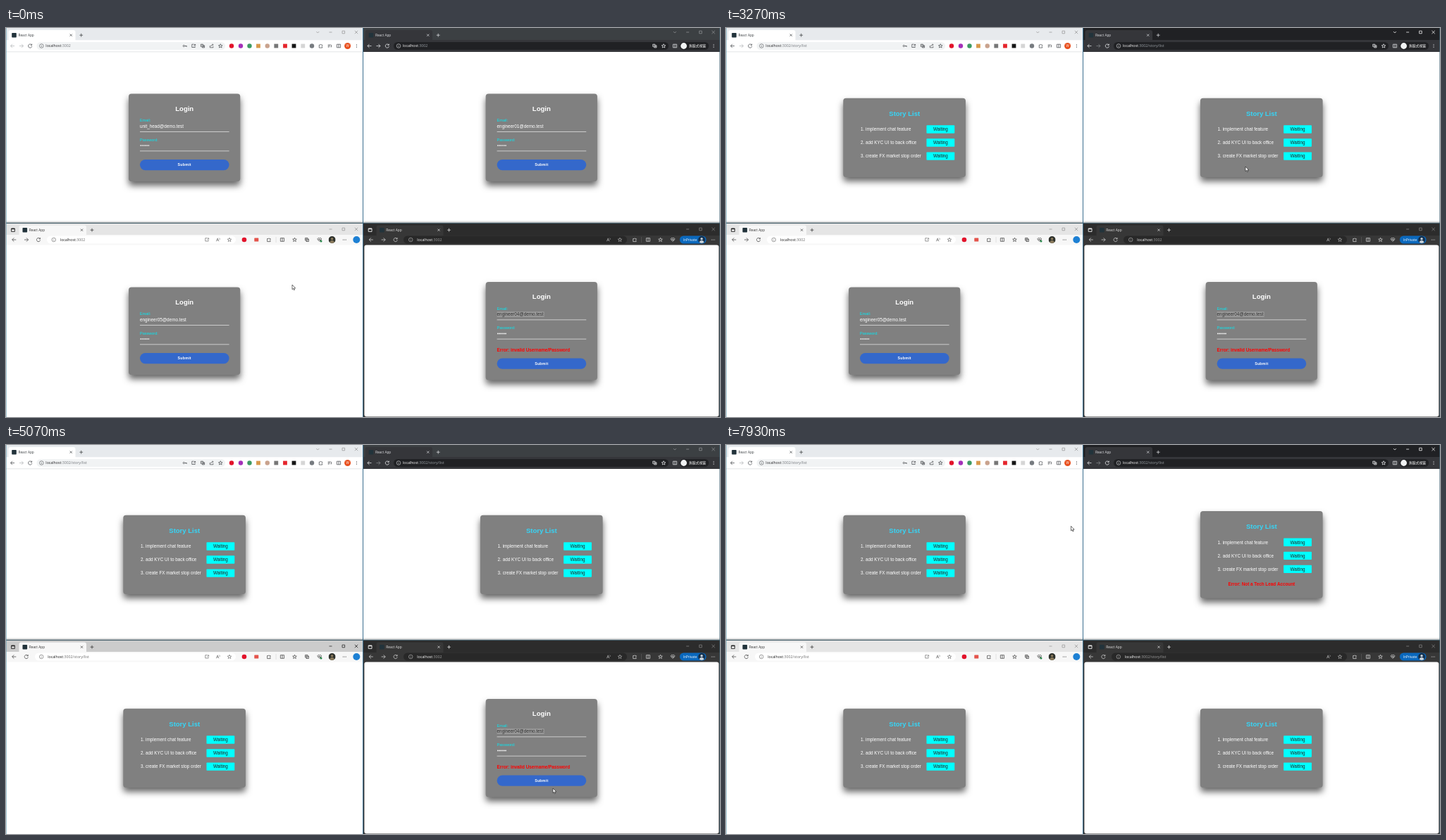
Write an HTML page with a canvas that moves like this. It is 1013 by 553 pixels and loops after 8000 ms.

```html
<!DOCTYPE html>
<html lang="en">
<head>
<meta charset="utf-8">
<title>Story board login</title>
<style>
html, body { margin: 0; width: 100%; height: 100%; overflow: hidden; background: #fff; }
canvas { display: block; width: 1013px; height: 553px; }
</style>
</head>
<body>
<canvas id="stage"></canvas>
<script>
const W = 1013, H = 553, LOOP = 8000, FPS = 15;
const canvas = document.getElementById('stage');
const g = canvas.getContext('2d');
const dpr = window.devicePixelRatio || 1;
canvas.width = W * dpr;
canvas.height = H * dpr;

const UI = '"Open Sans", "Noto Sans", sans-serif';
const CJK = '"Noto Sans CJK TC", "Noto Sans CJK JP", sans-serif';
const ARIAL = '"Liberation Sans", Arial, sans-serif';
const BODY = 6.33, COL = 506.6, ROW = 275;

// ---------- drawing helpers ----------
function box(x, y, x2, y2, fill, r = 0) {
  g.fillStyle = fill;
  g.beginPath();
  g.roundRect(x, y, x2 - x, y2 - y, r);
  g.fill();
}

function dot(x, y, r, fill) {
  g.fillStyle = fill;
  g.beginPath();
  g.arc(x, y, r, 0, 7);
  g.fill();
}

// y is the middle of the capitals
function text(s, x, y, size, color, { font = ARIAL, weight = 400, align = 'left', gap = 0 } = {}) {
  g.font = `${weight} ${size}px ${font}`;
  g.letterSpacing = gap + 'px';
  g.textAlign = align;
  g.fillStyle = color;
  g.fillText(s, x, y + size * 0.36);
  g.letterSpacing = '0px';
  return g.measureText(s).width;
}

const ICONS = {
  back: 'M2.8 0H-2.8M-.2-2.6L-2.8 0L-.2 2.6',
  fwd: 'M-2.8 0H2.8M.2-2.6L2.8 0L.2 2.6',
  reload: 'M2.2-1.4A2.6 2.6 0 1 0 2.6.5M2.5-2.9V-1.1H.7',
  info: 'M2.8 0A2.8 2.8 0 1 1-2.8 0A2.8 2.8 0 1 1 2.8 0M0-.3V1.5M0-1.6V-1.1',
  star: 'M0-2.8L.8-.9L2.8-.8L1.2.5L1.8 2.5L0 1.4L-1.8 2.5L-1.2.5L-2.8-.8L-.8-.9Z',
  close: 'M-1.6-1.6L1.6 1.6M1.6-1.6L-1.6 1.6',
  big: 'M-2.2-2.2L2.2 2.2M2.2-2.2L-2.2 2.2',
  plus: 'M-2.4 0H2.4M0-2.4V2.4',
  min: 'M-2 0H2',
  max: 'M-1.8-1.8H1.8V1.8H-1.8Z',
  chev: 'M-2-1L0 1L2-1',
  puzzle: 'M-2.3-1.5H-.8A.9.9 0 0 1 .9-1.5H2.1V-.1A.9.9 0 0 0 2.1 1.5V2.6H-2.3Z',
  split: 'M-2.6-2.3H2.6V2.3H-2.6ZM0-2.3V2.3',
  key: 'M-.4 0A1.1 1.1 0 1 1-2.6 0A1.1 1.1 0 1 1-.4 0H2.6V1.2M1.3 0V1',
  page: 'M.6-2.3H-2.2V2H2.2V.4M.4 0L2.6-1.8M1-2.1H2.7V-.4',
  share: 'M-2.3-.4V2.3H2.3V.6M-.9.5C-.7-1.2.4-1.7 2.4-1.7M1.2-2.8L2.5-1.7L1.2-.5',
  lang: 'M-2.6-2.4H.5V1H-2.6ZM-1.8-1H-.3M.5-.8H2.6V2.4H-.6V1M.6 1.7L1.5.2L2 1.7',
  list: 'M-2.6-1.6H1.4M-2.6 0H.4M-2.6 1.6H-.4M2.3-1.6V1.4M1.2 1.4H2.3',
  aloud: 'M-2.6 2.3L-.8-2.2L1 2.3M-2 .7H.4M1.5-2.4Q2.7-1.4 2.2-.2',
  heart: 'M0 2.4L-2.5-.2A1.4 1.4 0 0 1 0-1.8A1.4 1.4 0 0 1 2.5-.2ZM-2 0H-.6L0-.9L.6.8L1 0H2',
  stack: 'M-2.5-2.5H1V1H-2.5ZM-1 1V2.5H2.5V-1H1M-.7-1.7V.3M-1.7-.7H.3',
  window: 'M-2.4-2.2H2.4V2.2H-2.4ZM-2.4-1.5H2.4M-1.8-1.8H1.8'
};
for (const k in ICONS) ICONS[k] = new Path2D(ICONS[k]);

function icon(name, x, y, color, width = 0.75) {
  g.save();
  g.translate(x, y);
  g.strokeStyle = color;
  g.lineWidth = width;
  g.stroke(ICONS[name]);
  g.restore();
}

function icons(y, color, items) {
  for (const [name, x] of items) icon(name, x, y, color);
}

function more(x, y, color, dx, dy) {
  for (let i = -1; i < 2; i++) dot(x + i * dx, y + i * dy, 0.6, color);
}

function person(x, y, back, front) {
  g.save();
  g.beginPath();
  g.arc(x, y, 5, 0, 7);
  g.clip();
  box(x - 5, y - 5, x + 5, y + 5, back);
  dot(x, y - 1.2, 1.7, front);
  dot(x, y + 4.2, 3.2, front);
  g.restore();
}

function card(x, y, x2, y2) {
  g.save();
  g.shadowColor = 'rgba(0,0,0,.6)';
  g.shadowBlur = 10 * dpr;
  g.shadowOffsetY = 6 * dpr;
  box(x, y, x2, y2, '#808080', 4);
  g.restore();
}

// ---------- pages ----------
function loginPage(x, y, mail, hover, failed) {
  const shift = failed ? 15.2 : 0;
  const left = x + 190, mid = x + 253.2;
  card(x + 174, y + 93.5, x + 332.3, y + 218 + shift);
  text('Login', mid, y + 114.6, 9.5, '#fff', { weight: 700, align: 'center' });
  text('Email:', left, y + 131.5, 5.54, '#03e9f4');
  if (failed) box(left, y + 135.8, left + 67, y + 143.3, '#9b9b9b');
  text(mail, left, y + 139.8, BODY, failed ? '#303030' : '#fff');
  text('Password:', left, y + 158.8, 5.54, '#03e9f4');
  for (let i = 0; i < 6; i++) dot(left + 1.2 + i * 2.24, y + 167, 0.85, '#fff');
  for (const line of [147, 174.4]) box(left, y + line, x + 316.6, y + line + 0.8, '#e4e4e4');
  if (failed) text('Error: invalid Username/Password', left, y + 190.2, BODY, '#f00', { weight: 700 });
  const top = y + 187 + shift;
  box(left, top, x + 316.6, top + 15.2, hover ? '#0b5cf0' : '#3468cb', 7.6);
  text('Submit', mid, top + 7.6, 5.27, '#fff', { weight: 700, align: 'center', gap: 0.25 });
}

const STORIES = ['implement chat feature', 'add KYC UI to back office', 'create FX market stop order'];

function listPage(x, y, denied) {
  const up = denied ? 5.7 : 0;
  const mid = x + 253.2;
  card(x + 166.3, y + 99.8 - up, x + 340, y + 212 + up);
  text('Story List', mid, y + 121.2 - up, 9.5, '#35d5f7', { weight: 700, align: 'center' });
  STORIES.forEach((s, i) => {
    const cy = y + 144 + i * 19.05 - up;
    text(`${i + 1}. ${s}`, x + 191, cy, BODY, '#fff');
    box(x + 284.5, cy - 5.7, x + 324.3, cy + 5.7, '#0ff', 0.8);
    text('Waiting', x + 304.4, cy, BODY, '#222', { align: 'center' });
  });
  if (denied) text('Error: Not a Tech Lead Account', mid, y + 197.6, BODY, '#f00', { weight: 700, align: 'center' });
}

// ---------- browser frames ----------
function address(x, y, inner, strong, soft) {
  const opt = { font: UI };
  const w = text('localhost', x, y, 5.25, strong, opt);
  text(':3002' + (inner ? '/story/list' : ''), x + w, y, 5.25, soft, opt);
}

function tab(x, y, fg) {
  box(x, y - 3.3, x + 6.6, y + 3.3, '#22333b', 0.8);
  text('React App', x + 9.3, y, 4.75, fg, { font: UI });
  icon('close', x + 84, y, fg, 0.7);
  icon('plus', x + 98.5, y, fg);
}

function controls(x, y, color, chev) {
  if (chev) icon('chev', x + 442.3, y, color);
  icons(y, color, [['min', x + 460.5], ['max', x + 478.8]]);
  icon('big', x + 497, y, color);
}

function lightChrome(active, inner) {
  const ink = '#4a4d51', dim = '#b4b7ba', y = 25.5;
  box(0, 0, 506.5, 277, '#fff');
  box(0, 0, 506.5, 17.2, active ? '#dee1e6' : '#e7eaed');
  box(3.5, 3, 98.5, 18, '#fff', [3, 3, 0, 0]);
  tab(8.2, 10.2, '#3c4043');
  controls(0, 6, active ? '#222' : '#999', true);
  icon('back', 9.3, y, inner ? ink : dim);
  icon('fwd', 21.8, y, dim);
  icon('reload', 34.2, y, ink);
  box(43.5, 20, 311, 31, '#f1f3f4', 5.5);
  icon('info', 50.4, y, ink, 0.6);
  address(56.3, y, inner, '#202124', '#74787d');
  icons(y, ink, [['key', 253.8], ['page', 266], ['lang', 279], ['share', 291.6], ['star', 304.3],
    ['puzzle', 446.6], ['list', 459.3], ['split', 472]]);
  [[320, '#e2122b'], [333, '#a330b8'], [345.5, '#3d9b62'], [370.8, '#c9a28d'], [434, '#777b80']]
    .forEach(([x, c]) => dot(x, y, 3.2, c));
  [[358, '#d8994b'], [383.3, '#777'], [396, '#e5252c'], [408.5, '#161616'], [421.3, '#d5d5d5']]
    .forEach(([x, c]) => box(x - 2.9, y - 2.9, x + 2.9, y + 2.9, c));
  dot(484.6, y, 4.5, '#e8501e');
  text('W', 484.6, y, 4.6, '#fff', { font: UI, align: 'center' });
  more(497.4, y, ink, 0, 2);
  box(0, 33.6, 506.5, 34.2, '#dadce0');
}

function darkChrome(active, inner) {
  const ink = '#e8eaed', y = 25.5;
  box(507, 0, W, 277, '#fff');
  box(507, 0, W, 17.2, active ? '#202124' : '#3c4043');
  box(507, 17, W, 34, '#35363a');
  box(509.5, 3, 605, 18, '#35363a', [3, 3, 0, 0]);
  tab(514.7, 10.2, '#dfe1e5');
  controls(COL, 6, active ? '#fff' : '#909396', true);
  icon('back', 515.7, y, ink);
  icon('fwd', 528.2, y, inner ? '#85878a' : ink);
  icon('reload', 540.8, y, ink);
  box(550, 20, 940, 31, '#202124', 5.5);
  icon('info', 557, y, ink, 0.6);
  address(562.9, y, inner, '#fff', '#9aa0a6');
  icons(y, ink, [['lang', 920.3], ['star', 933], ['split', 949]]);
  box(955.8, 20, 997, 31, '#202124', 5.5);
  dot(961.6, y, 4.4, '#f1f3f4');
  text('無痕式視窗', 969, y, 4.8, '#fff', { font: CJK });
  more(1004, y, ink, 0, 2);
}

function lightEdge(active, inner) {
  const ink = '#444', y = 301;
  box(0, 278, 506.5, H, '#fff');
  box(0, 278, 506.5, 295, active ? '#cccccc' : '#e5e5e5');
  box(0, 294, 506.5, 308.6, '#f7f7f7');
  box(18.5, 280.5, 114, 295, '#f7f7f7', [3, 3, 0, 0]);
  icon('window', 10, 287.2, '#222', 0.9);
  tab(23.5, 287.2, '#333');
  controls(0, 286, active ? '#222' : '#999');
  icon('back', 11.5, y, ink);
  if (!inner) icon('fwd', 28.8, y, ink);
  icon('reload', inner ? 28.8 : 46, y, ink);
  box(inner ? 41 : 58, 295.5, 326, 306.5, '#fff', 5.5);
  icon('info', inner ? 50.2 : 67.8, y, ink, 0.5);
  address(inner ? 59.2 : 76.8, y, inner, '#1b1b1b', '#6b6b6b');
  icons(y, '#777', [['page', 285], ['aloud', 301], ['star', 317]]);
  dot(338, y, 3.3, '#e2122b');
  box(352.3, y - 2.4, 358.3, y + 2.6, '#e4534a', 0.5);
  icons(y, ink, [['puzzle', 373], ['split', 392], ['star', 409.5], ['stack', 427], ['heart', 444.8]]);
  dot(447, 303, 1.5, '#27884a');
  box(382.8, 297, 383.3, 305, '#ccc');
  person(462.6, y, '#2d302b', '#8a7a5c');
  more(480.3, y, ink, 2, 0);
  dot(497.3, y, 5, '#1d80d4');
}

function darkEdge(active, inner) {
  const ink = '#d6d6d6', y = 301;
  const bar = active ? '#3b3b3b' : '#373737';
  box(507, 278, W, H, bar);
  box(507, 278, W, 295, active ? '#1b1b1b' : '#2c2c2c');
  box(525.5, 280.5, 620.5, 295, bar, [3, 3, 0, 0]);
  box(508.4, 308.6, 1011.3, 552.4, '#fff', 3);
  icon('window', 516.6, 287.2, '#eee', 0.9);
  tab(530, 287.2, '#e4e4e4');
  controls(COL, 286, active ? '#fff' : '#858585');
  icon('back', 518, y, ink);
  if (!inner) icon('fwd', 535.4, y, ink);
  icon('reload', inner ? 535.4 : 552.6, y, ink);
  box(inner ? 547 : 564, 295.5, 881, 306.5, '#282828', 5.5);
  icon('info', inner ? 556.8 : 574.2, y, ink, 0.5);
  address(inner ? 565.8 : 583.2, y, inner, '#fff', '#a0a0a0');
  icons(y, '#a5a5a5', [['aloud', 855], ['star', 871]]);
  icons(y, ink, [['puzzle', 892], ['split', 911], ['star', 928.5], ['heart', 946]]);
  box(901.3, 297, 901.8, 305, '#666');
  box(955.8, 295.4, 993.5, 306.6, '#0a68bd', 5.6);
  text('InPrivate', 961, y, 4.6, '#fff', { font: UI });
  person(987, y, '#14304d', '#c9d3dc');
  more(1003.2, y, ink, 2, 0);
}

function borders() {
  const shade = g.createLinearGradient(0, 273.5, 0, 277);
  shade.addColorStop(0, 'rgba(0,0,0,0)');
  shade.addColorStop(1, 'rgba(0,0,0,.22)');
  g.fillStyle = shade;
  g.fillRect(0, 273.5, W, 3.5);
  box(0, 276.8, W, 278, '#47606c');
  box(506.1, 0, 507, H, '#31688a');
  box(0, 0, 0.6, H, '#69a3b8');
  box(1012.4, 0, W, H, '#4a6b7c');
}

// ---------- pointer ----------
// time, x, y, steady (1 = constant speed towards this point)
const PATH = [
  [0, 406, 365], [600, 288, 196], [1930, 288, 196], [2600, 729.5, 227.3],
  [2930, 737, 197], [3270, 737, 197], [3730, 227, 453], [4070, 232, 469.5, 1],
  [4330, 232, 469.5], [4930, 776, 480], [5000, 776, 486, 1], [5070, 776, 488, 1],
  [5400, 776, 488], [5600, 776, 478, 1], [6130, 776, 478], [6400, 819.6, 177.3],
  [6800, 815, 141.4], [7130, 815, 141.4], [7800, 567, 125, 1], [7870, 516, 118.5, 1],
  [7930, 489.5, 115.3, 1], [8000, 489.5, 115.3]
];

function pointerAt(t) {
  const i = PATH.findIndex(k => k[0] > t);
  const [t0, x0, y0] = PATH[i - 1], [t1, x1, y1, steady] = PATH[i];
  const p = (t - t0) / (t1 - t0);
  const e = steady ? p : p * p * (3 - 2 * p);
  return [x0 + (x1 - x0) * e, y0 + (y1 - y0) * e];
}

const ARROW = new Path2D('M0 0V6.6L1.5 5.3L2.5 7.6L3.6 7.1L2.6 4.9H4.7Z');
const BEAM = new Path2D('M-1-2.8H1M0-2.8V2.6M-1 2.6H1');

function pointer(x, y, beam) {
  g.save();
  g.translate(x, y);
  g.lineWidth = 0.6;
  g.strokeStyle = '#111';
  if (!beam) {
    g.fillStyle = '#fff';
    g.fill(ARROW);
  }
  g.stroke(beam ? BEAM : ARROW);
  g.restore();
}

// ---------- timeline ----------
const FOCUS = [[1870, 0], [3130, 1], [4130, 2], [5330, 3], [7070, 1]];
const WINDOWS = [
  { frame: lightChrome, x: 0, y: 0, mail: 'unit_head@demo.test', enter: 1930 },
  { frame: darkChrome, x: COL, y: 0, mail: 'engineer01@demo.test', enter: 3270, deny: 7200 },
  { frame: lightEdge, x: 0, y: ROW, mail: 'engineer05@demo.test', enter: 4330 },
  { frame: darkEdge, x: COL, y: ROW, mail: 'engineer04@demo.test', enter: 5930, failed: true }
];

function status(t) {
  if (t < 5930 || t >= 6530) return;
  g.globalAlpha = Math.min(1, (6530 - t) / 150);
  box(508.4, 544.4, 675, 552.6, '#c6c6c6', [0, 2, 0, 2]);
  text('Connecting...', 511, 548.7, 4.75, '#fff', { font: UI });
  g.globalAlpha = 1;
}

function draw(t) {
  g.setTransform(dpr, 0, 0, dpr, 0, 0);
  const [px, py] = pointerAt(t);
  const focus = FOCUS.reduce((a, [at, id]) => t >= at ? id : a, -1);
  WINDOWS.forEach((w, id) => {
    const inner = t >= w.enter;
    w.frame(id === focus, inner);
    if (inner) return listPage(w.x, w.y, t >= w.deny);
    const y = w.failed ? w.y - 7.6 : w.y;
    const top = y + 187 + (w.failed ? 15.2 : 0);
    const hover = px > w.x + 190 && px < w.x + 316.6 && py > top && py < top + 15.2;
    loginPage(w.x, y, w.mail, hover, w.failed);
  });
  status(t);
  borders();
  pointer(px, py, px > 791 && px < 831 && py > 138 && py < 188);
}

function tick(now) {
  const step = Math.floor(((now % LOOP) + 5) * FPS / 1000) % (LOOP * FPS / 1000);
  draw(Math.round(step * 100 / FPS) * 10);
  requestAnimationFrame(tick);
}

const start = performance.now();
const loop = now => tick(Math.max(0, now - start));
function run(now) {
  const t = Math.max(0, now - start) % LOOP;
  const step = Math.floor((t + 5) * FPS / 1000) % (LOOP * FPS / 1000);
  draw(Math.round(step * 100 / FPS) * 10);
  requestAnimationFrame(run);
}
run(start);
</script>
</body>
</html>
```
